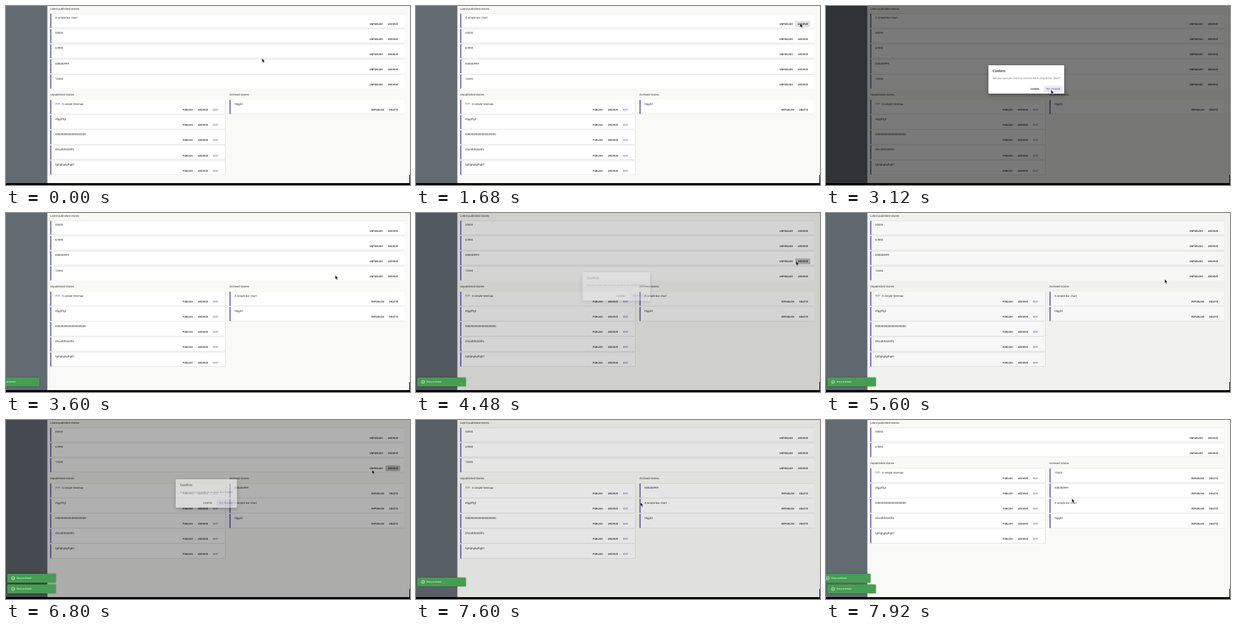
Animation, 640 px wide and 284 px high, one loop 8000 ms. Source, as an HTML page:

```html
<!DOCTYPE html>
<html lang="en">
<head>
<meta charset="utf-8">
<title>Story archive</title>
<style>
  html, body { margin: 0; width: 100%; height: 100%; overflow: hidden; background: #000; }
  svg { display: block; width: 100vw; height: 100vh; }
  text { font: 4.33px Roboto, sans-serif; fill: #2b2b2b; text-rendering: geometricPrecision; white-space: pre; }
  .btn { font-size: 3.87px; font-weight: 500; fill: #1c1c1c; }
  .accent { fill: #6a66b0; }
  .card { fill: #fff; filter: drop-shadow(0 .6px .6px rgba(0,0,0,.38)); }
  .panel { fill: #fff; filter: drop-shadow(0 2px 3px rgba(0,0,0,.4)); }
  .heading { font-size: 5.6px; font-weight: 500; }
  .message { fill: #777; }
  .toast { fill: #459e51; filter: drop-shadow(0 .6px .8px rgba(0,0,0,.35)); }
  .toast-text { font-size: 3.75px; fill: #fff; }
  .icon { fill: none; stroke: #fff; stroke-width: .6; }
</style>
</head>
<body>
<svg id="stage" viewBox="0 0 640 284" preserveAspectRatio="none"></svg>
<script>
const LOOP = 8000, STEP = 80, PITCH = 24.07;
const stage = document.getElementById('stage');

function add(parent, tag, attrs = {}, content = '') {
  const node = document.createElementNS('http://www.w3.org/2000/svg', tag);
  for (const key in attrs) node.setAttribute(key, attrs[key]);
  node.textContent = content;
  return parent.appendChild(node);
}
const rect = (parent, x, y, width, height, attrs) => add(parent, 'rect', { x, y, width, height, ...attrs });
const label = (parent, x, y, content, cls = '') => add(parent, 'text', { x, y, class: cls }, content);

function card(parent, x, y, width, title, buttons) {
  rect(parent, x, y, width, 22.4, { class: 'card', rx: .6 });
  rect(parent, x, y, 1.8, 22.4, { class: 'accent' });
  label(parent, x + 8, y + 8, title);
  for (const [name, left] of buttons) {
    label(parent, left, y + 17.4, name, name === 'EDIT' ? 'btn accent' : 'btn');
  }
}

const drafts = ['777 - A simple treemap', 'dfggfffgf', '0'.repeat(20), 'dfssdfdfdsfdffs', 'fghfghghgfhghf'];
const publishedButtons = [['UNPUBLISH', 576], ['ARCHIVE', 605]];
const draftButtons = [['PUBLISH', 280], ['ARCHIVE', 304], ['EDIT', 328]];
const archivedButtons = [['REPUBLISH', 579], ['DELETE', 607.3]];

function page(published, archived) {
  const group = add(stage, 'g');
  const top = 28.6 + published.length * PITCH;
  const list = (titles, x, y, width, buttons) =>
    titles.forEach((title, i) => card(group, x, y + i * PITCH, width, title, buttons));
  label(group, 70, 5.9, 'Latest published stories');
  list(published, 70, 12.3, 561, publishedButtons);
  label(group, 70, top - 6.6, 'Unpublished stories');
  list(drafts, 70, top, 277.5, draftButtons);
  label(group, 354, top - 6.6, 'Archived stories');
  list(archived, 354, top, 277, archivedButtons);
  return group;
}

function dialog(title, width) {
  const group = add(stage, 'g');
  const left = 317.3 - width / 2, right = left + width;
  rect(group, left, 94, width, 45, { class: 'panel', rx: 1 });
  label(group, left + 6.6, 105.4, 'Confirm', 'heading');
  label(group, left + 6.6, 116.4, `Are you sure you want to archive the ${title}?`, 'message');
  label(group, right - 53.5, 132.9, 'CANCEL', 'btn');
  rect(group, right - 32, 126.4, 29, 10.6, { rx: 1, fill: '#6a66b0', opacity: .14 });
  label(group, right - 28.8, 132.9, 'YES, PLEASE', 'btn accent');
  return group;
}

function toast() {
  const group = add(stage, 'g');
  rect(group, 2, 0, 77, 14, { class: 'toast', rx: 1 });
  add(group, 'circle', { cx: 11.2, cy: 7, r: 2.5, class: 'icon' });
  add(group, 'path', { d: 'M9.9 7.1l1 1 1.7-2', class: 'icon' });
  label(group, 16.8, 8.4, 'Story archived', 'toast-text');
  return group;
}

// Scene, back to front
rect(stage, 0, 0, 640, 281, { fill: '#f9f9f7' });
rect(stage, 0, 0, 65.5, 281, { fill: '#626b72' });

const pages = [
  { from: 0, node: page(['A simple bar chart', '55555', '67890', '000000999', '12345'], ['fdggfd']) },
  { from: 3480, node: page(['55555', '67890', '000000999', '12345'], ['A simple bar chart', 'fdggfd']) },
  { from: 6080, node: page(['55555', '67890', '12345'], ['000000999', 'A simple bar chart', 'fdggfd']) },
  { from: 7680, node: page(['55555', '67890'], ['12345', '000000999', 'A simple bar chart', 'fdggfd']) }
];
const hover = rect(stage, 601, 0, 23.5, 9.4, { rx: 1 });
const backdrop = rect(stage, 0, 0, 640, 281);
const dialogs = [
  { open: 1720, close: 3120, node: dialog('A simple bar chart', 120) },
  { open: 4440, close: 5360, node: dialog('000000999', 107) },
  { open: 6720, close: 7440, node: dialog('12345', 97) }
];
const toasts = [
  { from: 3500, y: [[0, 261]], fade: [[7440, 1], [7600, 0]], node: toast() },
  { from: 6100, y: [[7520, 244], [7720, 261]], fade: [[0, 1]], node: toast() },
  { from: 7758, y: [[0, 244]], fade: [[0, 1]], node: toast() }
];
const cursor = add(stage, 'path', {
  d: 'M0 0V6.4L1.5 5.1 2.6 7.5 3.7 7 2.6 4.7H4.6Z', fill: '#111', stroke: '#fff', 'stroke-width': .35
});
rect(stage, 0, 281, 640, 3);
rect(stage, 639, 268, 1, 13);

const linear = p => p;
const smooth = p => p * p * (3 - 2 * p);
const clamp = p => Math.min(1, Math.max(0, p));

// Value at time t from [time, value] points
function track(t, points, ease = linear, column = 1) {
  const next = points.findIndex(point => point[0] > t);
  if (next === 0) return points[0][column];
  if (next < 0) return points[points.length - 1][column];
  const a = points[next - 1], b = points[next];
  return a[column] + (b[column] - a[column]) * ease((t - a[0]) / (b[0] - a[0]));
}

const cursorPath = [
  [720, 405.5, 83], [1280, 608.5, 27.5], [1760, 608.5, 27.5],
  [2400, 350, 149], [2880, 356.5, 133], [3200, 356.5, 133],
  [3840, 598, 83], [4000, 602, 76.5], [4560, 602, 76.5],
  [5200, 352, 132], [5360, 352, 132], [5600, 536.5, 105],
  [6240, 603, 77], [6720, 603, 77], [6800, 580, 79],
  [7360, 348, 132], [7480, 348, 132], [7920, 389.5, 124.5]
];
const hoverAlpha = [
  [1200, 0], [1280, .09], [1680, .12], [1760, .2], [2000, 0],
  [3760, 0], [3840, .09], [4160, .11], [4400, .11], [4480, .23], [4720, 0],
  [6240, 0], [6320, .1], [6640, .1], [6800, .23], [7040, 0]
];
const darken = [[0, 0], [40, .17], [80, .31], [160, .43], [320, .52]];
const lighten = [[0, .52], [80, .25], [160, .1], [240, .03], [320, 0]];

function render(t) {
  pages.forEach(({ from, node }, i) => {
    const end = pages[i + 1] ? pages[i + 1].from : LOOP;
    node.style.display = t >= from && t < end ? '' : 'none';
  });

  let shade = 0;
  for (const { open, close, node } of dialogs) {
    const opacity = t < close ? clamp((t - open) / 150) : clamp(1 - (t - close) / 80);
    node.setAttribute('opacity', opacity);
    shade += t < close ? track(t - open, darken) : track(t - close, lighten);
  }
  backdrop.setAttribute('opacity', shade);

  for (const { from, y, fade, node } of toasts) {
    const x = -87 * (1 - clamp((t - from) / 300)) ** 3;
    node.setAttribute('transform', `translate(${x} ${track(t, y, smooth)})`);
    node.setAttribute('opacity', track(t, fade));
  }

  hover.setAttribute('y', t < 3000 ? 23.8 : 71.9);
  hover.setAttribute('opacity', track(t, hoverAlpha));
  cursor.setAttribute('transform',
    `translate(${track(t, cursorPath, smooth)} ${track(t, cursorPath, smooth, 2)})`);
}

const start = performance.now();
function tick() {
  const t = (performance.now() - start) % LOOP;
  render(Math.floor(t / STEP) * STEP);
  requestAnimationFrame(tick);
}
tick();
</script>
</body>
</html>
```
